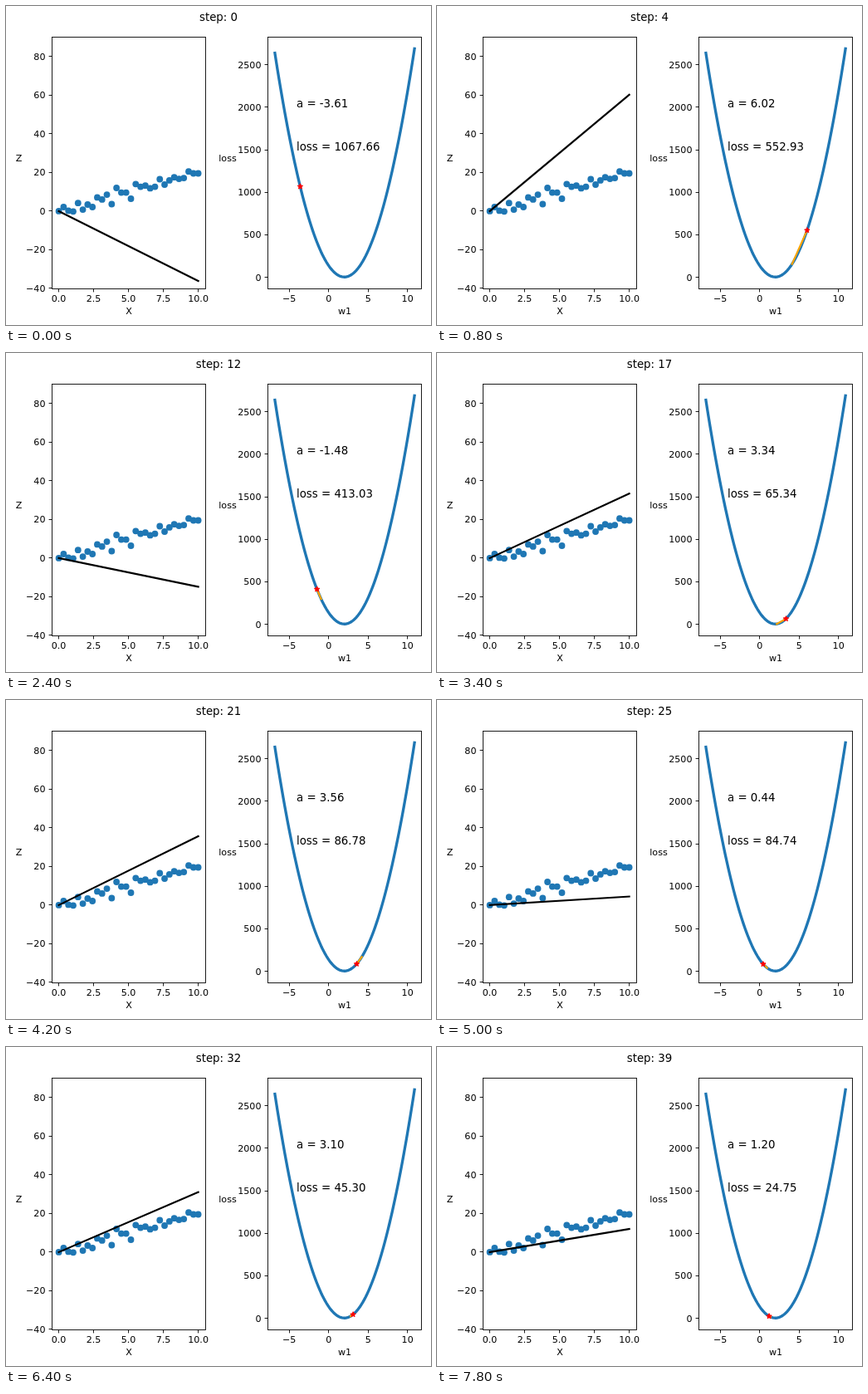
An HTML page with a canvas for the animation above (8 s loop, 512 by 384 pixels).

```html
<!DOCTYPE html>
<html>
<head>
<meta charset="utf-8">
<style>
  html, body { margin: 0; width: 100%; height: 100%; overflow: hidden; background: #fff; }
  canvas { display: block; }
</style>
</head>
<body>
<canvas id="stage" width="512" height="384"></canvas>
<script>
const ctx = document.getElementById('stage').getContext('2d');
const BLUE = '#1f77b4';
const STEP_MS = 200, STEPS = 40;
const TOP = 37.5, BOTTOM = 340.5;

// Quadratic loss and gradient descent with momentum
const BEST = 1.99143, CURVATURE = 33.90805, MIN_LOSS = 3.4625;
const MOMENTUM = 0.9, RATE = 0.1987015;
const lossAt = a => CURVATURE * (a - BEST) ** 2 + MIN_LOSS;

const path = [];
for (let a = -5, velocity = 0; path.length < STEPS;) {
  velocity = MOMENTUM * velocity - RATE * (a - BEST);
  path.push(a += velocity);
}

const samples = [
  0, 2.1, 0.2, -0.2, 4.2, 0.8, 3.4, 2.1, 7.1, 6, 8.5, 3.6, 12, 9.6, 9.6,
  6.4, 14, 12.6, 13.2, 11.8, 12.6, 16.5, 13.7, 15.9, 17.5, 16.7, 17.1, 20.5, 19.5, 19.5
];

const fit = {
  left: 55.5, right: 240.5,
  x: v => 63.6 + 16.8 * v,
  y: v => 246.9 - 2.327 * v,
  xTicks: [0, 2.5, 5, 7.5, 10], xFormat: v => v.toFixed(1),
  yTicks: [-40, -20, 0, 20, 40, 60, 80],
  xLabel: 'X', yLabel: 'Z', yLabelX: 15.5
};
const loss = {
  left: 315.5, right: 500.5,
  x: v => 388.7 + 9.497 * v,
  y: v => 326.6 - 0.1024 * v,
  xTicks: [-5, 0, 5, 10], xFormat: String,
  yTicks: [0, 500, 1000, 1500, 2000, 2500],
  xLabel: 'w1', yLabel: 'loss', yLabelX: 267
};

const LOW = -6.82, HIGH = 10.89;
const curve = Array.from({ length: 101 }, (_, i) => {
  const a = LOW + (HIGH - LOW) * i / 100;
  return [a, lossAt(a)];
});

const snap = v => Math.floor(v) + 0.5;

function text(str, x, y, align = 'left', size = 11.11) {
  ctx.font = `${size}px "DejaVu Sans", sans-serif`;
  ctx.textAlign = align;
  ctx.fillStyle = '#000';
  ctx.fillText(str, x, y);
}

function line(points, color, width, cap = 'square') {
  ctx.beginPath();
  points.forEach(([x, y]) => ctx.lineTo(x, y));
  ctx.strokeStyle = color;
  ctx.lineWidth = width;
  ctx.lineCap = cap;
  ctx.lineJoin = 'round';
  ctx.stroke();
}

const plot = (axes, points, color, width) =>
  line(points.map(([x, y]) => [axes.x(x), axes.y(y)]), color, width);

function drawAxes(axes) {
  const { left, right } = axes;
  const tick = (...points) => line(points, '#000', 0.89, 'butt');
  const label = str => str.replace('-', '\u2212');
  for (const v of axes.xTicks) {
    const x = snap(axes.x(v));
    tick([x, BOTTOM], [x, BOTTOM + 3.9]);
    text(label(axes.xFormat(v)), axes.x(v), 356, 'center');
  }
  for (const v of axes.yTicks) {
    const y = snap(axes.y(v));
    tick([left, y], [left - 3.9, y]);
    text(label(String(v)), left - 8, Math.round(axes.y(v) + 4), 'right');
  }
  ctx.strokeStyle = '#000';
  ctx.lineWidth = 0.89;
  ctx.lineJoin = 'miter';
  ctx.strokeRect(left, TOP, right - left, BOTTOM - TOP);
  text(axes.xLabel, (left + right) / 2, 370.5, 'center');
  text(axes.yLabel, axes.yLabelX, 187, 'center');
}

function drawStar(x, y) {
  ctx.beginPath();
  for (let i = 0; i < 10; i++) {
    const radius = i % 2 ? 1.27 : 3.33, angle = i * Math.PI / 5;
    ctx.lineTo(x + radius * Math.sin(angle), y - radius * Math.cos(angle));
  }
  ctx.closePath();
  ctx.fillStyle = ctx.strokeStyle = '#f00';
  ctx.lineWidth = 1.11;
  ctx.lineJoin = 'bevel';
  ctx.fill();
  ctx.stroke();
}

function draw(step) {
  const a = path[step], current = lossAt(a);
  ctx.fillStyle = '#fff';
  ctx.fillRect(0, 0, 512, 384);

  ctx.fillStyle = BLUE;
  samples.forEach((z, i) => {
    ctx.beginPath();
    ctx.arc(fit.x(10 * i / 29), fit.y(z), 3.9, 0, 2 * Math.PI);
    ctx.fill();
  });
  plot(fit, [[0, 0], [10, 10 * a]], '#000', 2.2);
  drawAxes(fit);

  plot(loss, curve, BLUE, 3.33);
  if (step > 0) {
    const previous = path[step - 1];
    plot(loss, [[previous, lossAt(previous)], [a, current]], '#ffa500', 2.2);
  }
  drawStar(loss.x(a), loss.y(current));
  drawAxes(loss);

  text(`a = ${a.toFixed(2)}`, 350, 122, 'left', 13.33);
  text(`loss = ${current.toFixed(2)}`, 350, 173.5, 'left', 13.33);
  text(`step: ${step}`, 256, 18, 'center', 13.33);
}

function animate() {
  draw(Math.floor(performance.now() / STEP_MS) % STEPS);
  requestAnimationFrame(animate);
}
animate();
</script>
</body>
</html>
```
